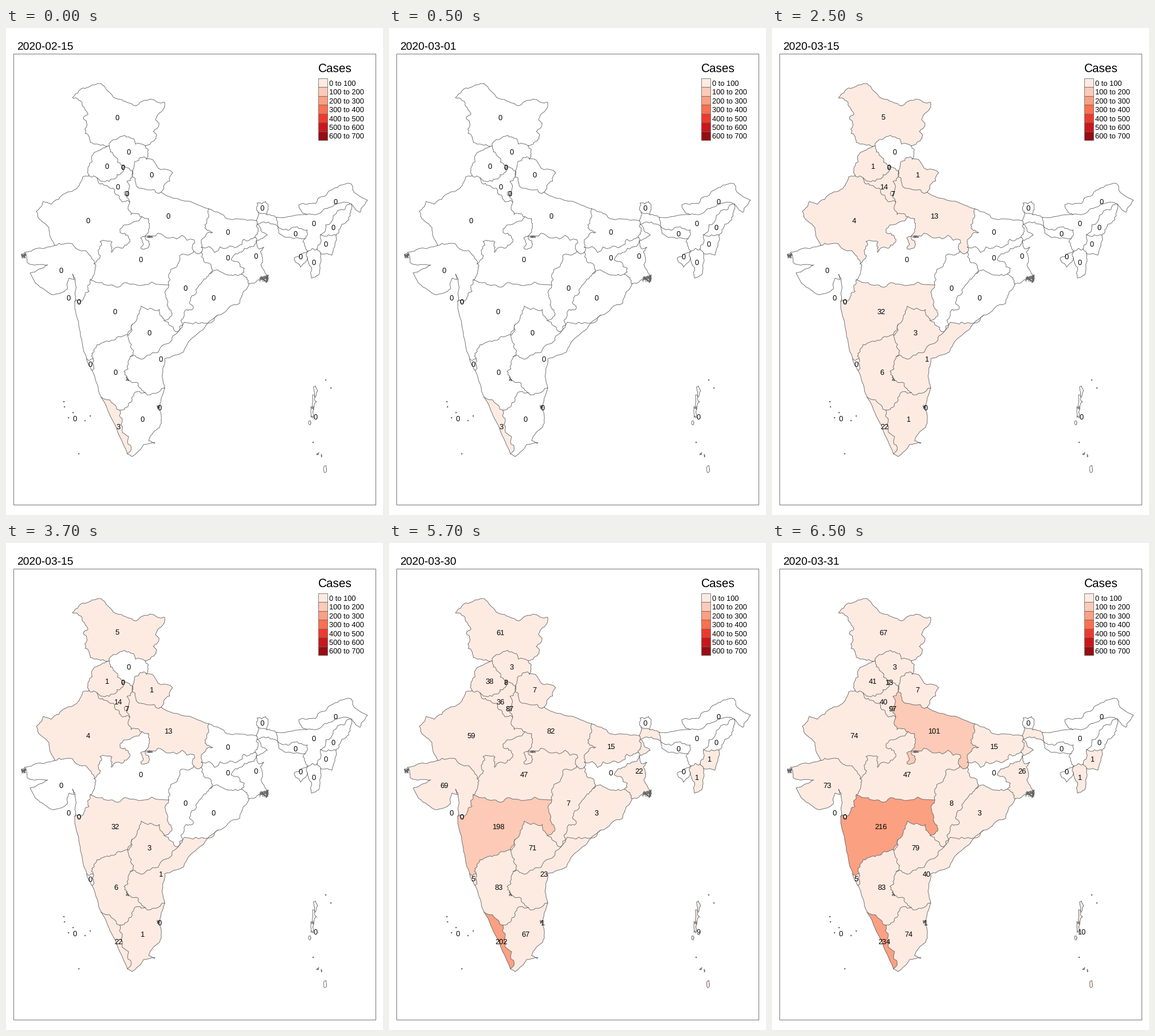
A matplotlib script for the animation above (8000 ms loop, 658 px wide and 851 px high).

```python
import numpy as np
import matplotlib.pyplot as plt
from matplotlib.animation import FuncAnimation
from matplotlib.patches import Polygon, Rectangle

W, H, DPI = 658, 851, 64
PX = 72 / DPI  # points per pixel
LINE = "#666666"
REDS = ["#fdebe2", "#fccab6", "#fca082", "#fb7050", "#ee3a2d", "#ca171c", "#980c13"]
SCENES = {0: "2020-02-15", 500: "2020-03-01", 2500: "2020-03-15",
          4500: "2020-03-30", 6500: "2020-03-31"}
INTERVAL, LOOP = 500, 8000

plt.rcParams.update({"font.family": "Liberation Sans", "text.hinting": "no_hinting"})
fig = plt.figure(figsize=(W / DPI, H / DPI), dpi=DPI, facecolor="white")
ax = fig.add_axes([0, 0, 1, 1])
ax.set(xlim=(0, W), ylim=(H, 0))
ax.axis("off")

# Points where areas meet, named after the areas and outside neighbours.
JUNCTIONS = {
    "jk hp pb": (180, 206), "jk pb out": (176, 207), "jk hp out cn": (243, 206),
    "hp uk cn np": (245, 229), "hp uk up hr": (221, 250), "hp pb hr": (204, 240),
    "pb rj out": (145, 258), "pb rj hr": (159, 262), "hr rj up": (216, 304),
    "rj up mp": (237, 330), "rj mp gj": (154, 412), "rj gj out": (85, 380),
    "gj mp mh": (147, 440), "gj mh out": (120, 478), "uk up np": (271, 287),
    "up br np": (354, 316), "up br jh": (341, 383), "up jh cg": (341, 392),
    "up cg mp": (328, 390), "cg mp mh": (284, 449), "cg mh tg": (276, 511),
    "cg tg ap or": (300, 531), "or ap out": (369, 502), "or cg jh": (356, 429),
    "or jh wb": (411, 430), "or wb bd out": (424, 447), "jh br wb": (435, 366),
    "br wb np": (437, 337), "mh tg ka": (220, 518), "tg ka ap": (217, 574),
    "ap ka tn": (243, 637), "ap tn out": (277, 629), "ka kl tn": (199, 668),
    "ka kl out": (166, 645), "kl tn out": (212, 744), "mh ga out": (141, 578),
    "mh ga ka": (152, 578), "ga ka out": (150, 598), "sk wb np cn": (440, 322),
    "sk wb bt cn": (455, 326), "wb as bt": (472, 331), "wb as ml bd": (475, 348),
    "as ml bd sy": (522, 368), "as ar bt cn": (525, 326), "as ar nl mm cn": (603, 308),
    "as nl mn": (549, 361), "nl mn mm": (576, 362), "as mn mz": (543, 386),
    "mn mz mm": (549, 394), "as mz tr sy": (527, 390), "mz tr sy mm": (526, 402),
}
borders, areas = {}, []


def roughen(points, amount, rng):
    """Midpoint displacement turns a few key points into a ragged border."""
    for _ in range(3):
        a, b = points[:-1], points[1:]
        normal = (b - a)[:, ::-1] * [-1, 1]
        out = np.empty((2 * len(a) + 1, 2))
        out[::2] = points
        out[1::2] = (a + b) / 2 + normal * rng.uniform(-amount, amount, (len(a), 1))
        points = out
    return points


def line(points, width=0.9):
    ax.plot(*np.transpose(points), color=LINE, lw=width * PX, zorder=3,
            solid_joinstyle="round")


def border(pair, *xy, rough=0.27):
    """Border of two areas: from one shared junction to the other through xy."""
    sides = set(pair.split())
    a, b = (np.array(p) for name, p in JUNCTIONS.items() if sides <= set(name.split()))
    inner = np.reshape(xy, (-1, 2))
    if xy and (np.hypot(*(a - inner[0])) + np.hypot(*(b - inner[-1]))
               > np.hypot(*(b - inner[0])) + np.hypot(*(a - inner[-1]))):
        a, b = b, a
    points = np.vstack([a, inner, b]).astype(float)
    borders[pair] = roughen(points, rough, np.random.default_rng(len(borders)))
    line(borders[pair])


def outline(code):
    """Chain all borders of an area into one ring."""
    left = [p for pair, p in borders.items() if code in pair.split()]
    ring = left.pop()
    while left:
        i = next(i for i, p in enumerate(left)
                 if any((ring[-1] == end).all() for end in (p[0], p[-1])))
        part = left.pop(i)
        ring = np.vstack([ring, part if (part[0] == ring[-1]).all() else part[::-1]])
    return ring


def text(x, y, s, px, ha="left"):
    return ax.text(x, y + 0.36 * px, s, fontsize=px * PX, ha=ha, va="baseline",
                   color="black", zorder=5)


def area(code, x, y, *counts, rings=None):
    """Label and fill an area; counts are for the latest dates, zero before."""
    rings = [outline(code)] if rings is None else rings
    patches = [ax.add_patch(Polygon(r, facecolor="white", lw=0)) for r in rings]
    counts = (0,) * (len(SCENES) - len(counts)) + counts
    areas.append((patches, text(x, y, "0", 12.9, "center"), counts))


def isle(x, y, w, h, ragged=0.2):
    rng = np.random.default_rng(x * y)
    turn = np.linspace(0, 2 * np.pi, 13)
    radius = rng.uniform(1 - ragged, 1 + ragged, 13) / 2
    radius[-1] = radius[0]
    ring = np.c_[x + w * radius * np.cos(turn), y + h * radius * np.sin(turn)]
    line(ring)
    return ring


def clutter(x, y, w, h, n):
    """Dense creeks and enclaves, drawn as a random scribble."""
    steps = np.random.default_rng(x + y).uniform(-0.5, 0.5, (n, 2))
    line([x, y] + steps * [w, h], 0.7)


# North
border("jk pb")
border("jk out", 147,200, 138,184, 141,171, 135,157, 143,150, 133,131, 116,122, 128,109,
       147,102, 172,102, 202,125, 222,135, 256,125, 277,130, 261,160, 267,166, 257,181,
       263,188, 259,197, rough=0.2)
border("jk hp", 187,195, 214,190)
border("hp cn", 247,222)
border("hp uk", 226,233)
border("hp pb", 190,224)
border("hr hp")
border("pb out", 162,214, 145,241, rough=0.2)
border("pb rj")
border("hr pb", 187,264, 203,252)
border("hr rj", 173,275, 196,292, 206,303)
border("hr up", 211,268)
border("uk np", 257,231, 291,253, 275,278, rough=0.18)
border("uk up", 225,266, 255,283)
border("up np", 299,298, rough=0.1)
border("br np", 371,322, 395,335, rough=0.14)

# West and centre
border("rj out", 134,260, 128,275, 104,289, 79,308, 65,303, 53,320, 75,349, rough=0.12)
border("rj up", 218,326)
border("rj mp", 208,344, 199,357, 213,363, 203,385, 184,392, 185,374, 164,373, 165,398)
border("rj gj", 116,377, 139,389, rough=0.2)
border("gj mp", 154,430)
border("gj mh", 145,460, 133,476)
border("gj out", 55,385, 32,392, 37,410, 73,414, 42,428, 68,458, 84,466, 107,456, 110,437,
       119,440, 116,430, 121,445, rough=0.12)
border("up mp", 249,333, 250,345, 235,367, 236,386, 249,383, 243,364, 286,367, 328,370)
border("up cg", 334,395)
border("up jh")
border("up br", 341,370, 361,357, 347,344)
border("br wb", 440,354)
border("br jh", 387,384, 415,369)
border("jh wb", 430,382, 416,385, 393,405, 416,420)
border("jh or", 390,432)
border("jh cg", 358,414)
border("or wb")
border("cg or", 343,443, 322,473, 327,489, 314,492)
border("or ap", 331,514)
border("or out", 408,481, 415,460, rough=0.12)
border("cg mp", 305,396, 297,418)
border("cg mh", 281,484, 288,493)
border("cg tg")
border("mp mh", 160,445, 190,452, 225,448, rough=0.2)

# South
border("mh out", 128,525, rough=0.06)
border("mh ga")
border("ga out", 145,590, rough=0.1)
border("ga ka", 153,589)
border("mh ka", 155,560, 180,548, 207,537)
border("mh tg", 236,486, 268,492)
border("tg ka", 219,553)
border("tg ap", 246,572, 280,552)
border("ap out", 318,549, 310,566, 277,578, 273,612, rough=0.1)
border("ap ka", 206,600, 219,619, 231,622)
border("ap tn")
border("ka tn", 220,645, 212,662)
border("ka kl")
border("ka out", 159,622, rough=0.06)
border("kl out", 184,682, rough=0.04)
border("kl tn", 203,685, 214,714)
border("tn out", 268,665, 268,698, 249,721, 260,725, 240,728, 220,749, rough=0.1)

# East and north-east
border("wb np")
border("sk cn", 438,306, 453,303)
border("sk wb", rough=0.15)
border("wb bt", rough=0.15)
border("wb as", rough=0.15)
border("wb bd", 458,339, 438,343, 456,362, 438,371, 440,385, 450,383, 444,391, 457,433,
       437,443, rough=0.18)
border("as bt", rough=0.06)
border("as ar", 552,320, 575,307, rough=0.14)
border("ar cn", 511,309, 540,307, 565,284, 602,272, 631,301, 618,322, rough=0.16)
border("as nl", 590,318, 558,344)
border("nl mm", 602,321, 586,343)
border("nl mn")
border("mn mm", 577,370, 569,397, rough=0.1)
border("mn mz")
border("as mn")
border("as mz")
border("mz mm", 549,410, 545,432, 533,437, rough=0.12)
border("mz tr")
border("tr sy", 518,394, 503,402, 514,418, rough=0.15)
border("as sy")
border("as ml", 526,353, 497,350)
border("ml bd", 476,358, 505,367, rough=0.15)

# Ragged deltas, enclaves and islets
clutter(31, 398, 9, 9, 30)
clutter(450, 439, 17, 14, 34)
clutter(456, 438, 5, 16, 18)
clutter(266, 662, 5, 7, 16)
clutter(212, 613, 8, 8, 10)
clutter(251, 365, 13, 4, 14)
clutter(545, 744, 5, 5, 7)
clutter(550, 748, 4, 7, 8)
for x, y in [(101, 653), (102, 662), (109, 681), (117, 672), (138, 686), (147, 678),
             (127, 744), (536, 724), (558, 615), (567, 629)]:
    isle(x, y, 1.4, 1.6)

# Code, label position and case counts
area("jk", 194.5, 156, 5, 61, 67)
area("hp", 214, 216, 3, 3)
area("pb", 176, 241, 1, 38, 41)
area("uk", 254, 256, 1, 7, 7)
area("hr", 195, 277, 14, 36, 40)
area("rj", 143.5, 336, 4, 59, 74)
area("up", 283, 328, 13, 82, 101)
area("br", 387.5, 356, 15, 15)
area("sk", 447, 314)
area("ar", 575.5, 303)
area("as", 537, 341)
area("ml", 505, 359)
area("nl", 571, 348)
area("mn", 558.5, 377, 1, 1)
area("mz", 537, 409, 1, 1)
area("tr", 514.5, 399)
area("wb", 436.5, 398, 22, 26)
area("jh", 387, 401)
area("or", 362.5, 471, 3, 3)
area("cg", 313, 454, 7, 8)
area("mp", 235.5, 404, 47, 47)
area("gj", 96, 423, 69, 73)
area("mh", 190.5, 495, 32, 198, 216)
area("tg", 250.5, 532, 3, 71, 79)
area("ap", 270, 578, 1, 23, 40)
area("ka", 191.5, 601, 6, 83, 83)
area("ga", 147.5, 587, 5, 5)
area("kl", 196.5, 696, 3, 3, 22, 202, 234)
area("tn", 238, 683, 1, 67, 74)
area("ch", 204, 243, 8, 13, rings=[isle(204, 243, 4, 6)])
area("dl", 211, 289, 7, 87, 97, rings=[isle(210, 289, 7, 8)])
area("dn", 127.5, 478, rings=[isle(127, 478, 6, 6)])
area("dd", 109.5, 471, rings=[])
area("py", 268, 663, 1, 1, rings=[])
area("ld", 120.5, 682, rings=[])
area("an", 540, 679, 9, 10, rings=[
    isle(540, 634, 5, 18, 0.5), isle(537, 653, 6, 20, 0.5), isle(534, 671, 5, 17, 0.5),
    isle(530, 690, 4, 7), isle(557, 771, 5, 13)])

# Frame, title and legend
ax.add_patch(Rectangle((13, 45), 632, 788, fill=False, ec=LINE, lw=0.9 * PX))
title = text(19.5, 31, "", 19.3)
text(544.5, 69.5, "Cases", 20.8)
for i, color in enumerate(REDS):
    top = 88 + 15.45 * i
    ax.add_patch(Rectangle((545, top), 15.5, 15.45, fc=color, ec=LINE, lw=0.8 * PX))
    text(564.5, top + 8, f"{100 * i} to {100 * i + 100}", 12.9)


def update(frame):
    scene = sum(frame * INTERVAL >= start for start in SCENES) - 1
    title.set_text(list(SCENES.values())[scene])
    for patches, label, counts in areas:
        count = counts[scene]
        label.set_text(str(count))
        for patch in patches:
            patch.set_facecolor(REDS[count // 100] if count else "white")


anim = FuncAnimation(fig, update, frames=LOOP // INTERVAL, init_func=lambda: update(0),
                     interval=INTERVAL, repeat=True, repeat_delay=0)
plt.show()
```
